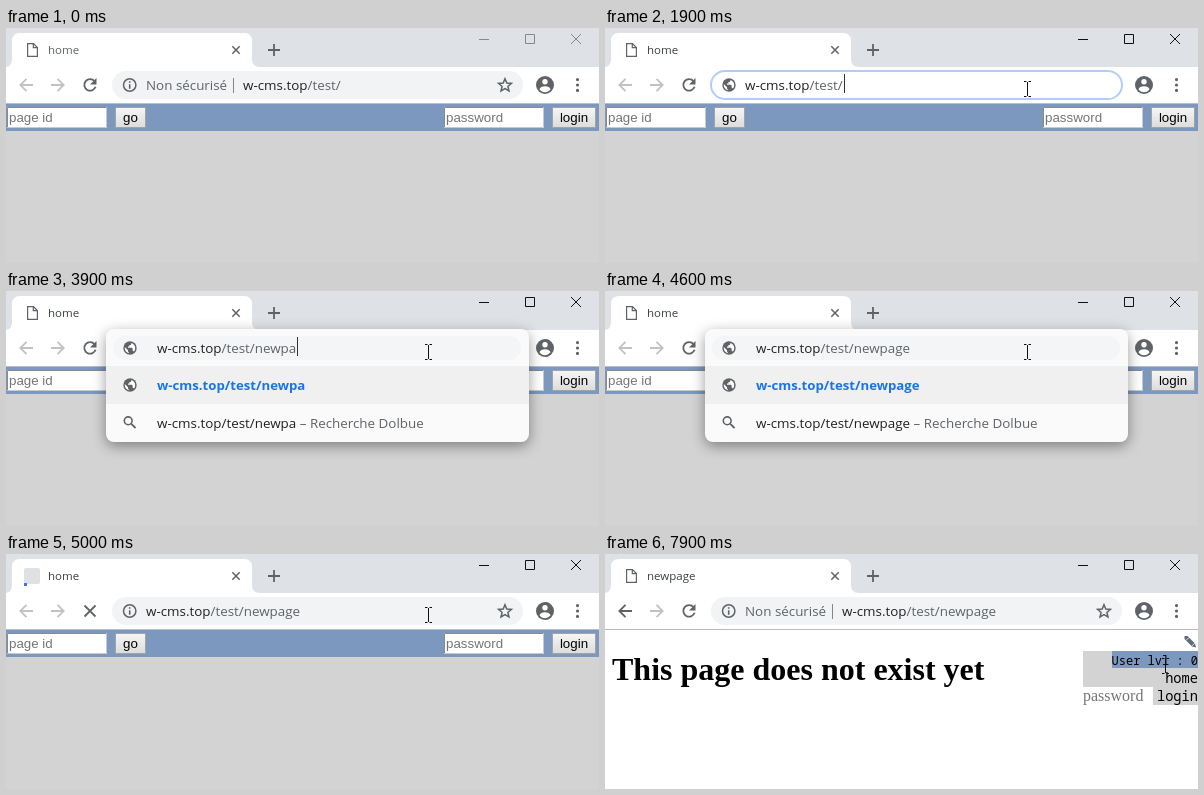
These frames come from a looping animation (593x235 px, 8 s). An HTML page:

```html
<!DOCTYPE html>
<html lang="fr">
<head>
<meta charset="utf-8">
<title>Browser demo</title>
<style>
html, body { margin: 0; width: 100%; height: 100%; overflow: hidden; background: #fff; }
svg { display: block; width: 593px; height: 235px; }
text { white-space: pre; }
.ui { font: 13.4px "Open Sans", "Noto Sans", sans-serif; fill: #5f6368; }
.ui .host, .dark { fill: #202124; }
.tab { font-size: 11.5px; fill: #45494d; }
.hit { font-weight: 700; font-size: 13.2px; fill: #1a73e8; }
.form { font: 13.33px "Liberation Sans", Arial, sans-serif; }
.hint { fill: #757575; }
.mono { font-family: "Noto Sans Mono", "DejaVu Sans Mono", monospace; text-anchor: end; }
.line { fill: none; stroke: #5f6368; stroke-width: 1.8; }
#popup { filter: drop-shadow(0 4px 7px rgba(0,0,0,.4)); }
</style>
</head>
<body>
<svg viewBox="0 0 593 235">
  <defs>
    <g id="globe">
      <circle r="6.7" fill="#5f6368"/>
      <path fill="#fff" d="M-5.2-.9L-2 2.3V3.6L-.7 5.2C-3.5 5-5.4 2.8-5.2-.9ZM1.6-5C4 -4 5.3-2 5.2.2 5.2 1.8 4.6 2.9 3.8 3.6L2.6 2.6V.6L1.8-.2H-2V-1.6H-.6V-3H.8Z"/>
    </g>
    <g id="field">
      <path d="M0 0H100V21H0Z" fill="#fff"/>
      <path d="M.5 20.5V.5H99.5" fill="none" stroke="#8a8a8a"/>
      <path d="M.5 20.5H99.5V.5" fill="none" stroke="#c9c9c9"/>
    </g>
    <linearGradient id="face" x2="0" y2="1">
      <stop stop-color="#f6f6f6"/><stop offset="1" stop-color="#dcdcdc"/>
    </linearGradient>
  </defs>

  <!-- window -->
  <path fill="#dee1e6" d="M0 0H593V39H0Z"/>
  <path fill="#fff" d="M0 39Q6 38 6 31V13Q6 5 14 5H238Q246 5 246 13V31Q246 39 254 39H593V75H0Z"/>
  <path id="doc" class="line" style="stroke-width:1.2" d="M21.6 15.6H27.5L31.4 19.5V28.4H21.6ZM27.3 15.6V19.7H31.4"/>
  <g id="busy"><rect x="18" y="14" width="16" height="16" rx="2" fill="#dfe1e5"/><path fill="#3b78e7" d="M18 29H21V32H18Z"/></g>
  <text id="title" class="ui tab" x="42" y="26"></text>
  <path class="line" style="stroke-width:1.5" d="M226.3 18.3L233.7 25.7M233.7 18.3L226.3 25.7"/>
  <path class="line" d="M262 22H274M268 16V28"/>
  <path id="controls" fill="none" d="M473 11.5H483M519.5 6.5H528.5V15.5H519.5ZM565 6L575 16M575 6L565 16"/>
  <path id="back" class="line" d="M27 57H14.5M20.5 50.8L14.3 57L20.5 63.2"/>
  <path class="line" style="stroke:#c0c2c5" d="M45 57H57.5M51.5 50.8L57.7 57L51.5 63.2"/>
  <g id="reload"><path class="line" d="M88.6 53.2A5.8 5.8 0 1 0 89.6 58.8"/><path fill="#5f6368" d="M90.5 50V56.5H84Z"/></g>
  <path id="stop" class="line" d="M78.5 51.5L89.5 62.5M89.5 51.5L78.5 62.5"/>
  <circle cx="539" cy="57" r="9" fill="#5f6368"/>
  <circle cx="539" cy="53.8" r="2.7" fill="#fff"/>
  <path fill="#fff" d="M533.5 61.2Q534.5 58.2 539 58.2T544.5 61.2Q542.5 64.2 539 64.2T533.5 61.2Z"/>
  <path stroke="#5f6368" stroke-width="3.2" stroke-linecap="round" d="M571.5 51.6h.01M571.5 57h.01M571.5 62.4h.01"/>

  <!-- first page -->
  <g id="home" class="form">
    <path fill="#d3d3d3" d="M0 75H593V235H0Z"/>
    <path fill="#7c98bf" d="M0 75H593V103H0Z"/>
    <path fill="#b5bfce" d="M0 75H593V76H0Z"/>
    <use href="#field" x="1" y="79"/><use href="#field" x="438" y="79"/>
    <text class="hint" x="3" y="94">page id</text>
    <text class="hint" x="440" y="94">password</text>
    <g fill="url(#face)" stroke="#a3a3a3">
      <rect x="109.5" y="79.5" width="30" height="20"/><rect x="546.5" y="79.5" width="43" height="20"/>
    </g>
    <g text-anchor="middle"><text x="124.5" y="94">go</text><text x="568" y="94">login</text></g>
  </g>

  <!-- second page -->
  <g id="missing">
    <path fill="#fff" d="M0 75H593V235H0Z"/>
    <path fill="#b8babd" d="M0 75H593V76H0Z"/>
    <text x="7" y="126" style="font:bold 32px 'Liberation Serif',Times,serif">This page does not exist yet</text>
    <path fill="#5d6b7d" d="M579.5 82L582.5 82L590 89.5L591 93.5L587 92.5L579.5 85Z"/>
    <path stroke="#fff" stroke-width=".8" d="M581 86.5L584 83.5M586.8 92L589.8 89"/>
  </g>
  <g id="menu">
    <path fill="#d3d3d3" d="M478 97H593V151H548V133H478Z"/>
    <path fill="#7c98bf" d="M507 97H593V114H507Z"/>
    <g class="mono">
      <text x="593" y="111" font-size="12">User lvl : 0</text>
      <text x="593" y="129" font-size="13.7">home</text>
      <text x="593" y="147" font-size="13.7">login</text>
    </g>
    <text class="hint" x="478" y="147" style="font:16px 'Liberation Serif',Times,serif">password</text>
  </g>

  <!-- suggestions -->
  <g id="popup">
    <rect x="100" y="38" width="423" height="113" rx="8" fill="#fafafa"/>
    <path fill="#f0f0f1" d="M100 75H523V113H100Z"/>
    <use href="#globe" x="124" y="94"/>
    <circle class="line" cx="122.2" cy="129.8" r="3.9" style="stroke-width:1.6"/><path class="line" d="M125 132.6L129.5 137"/>
    <text class="ui hit" x="151" y="99"></text>
    <text class="ui" x="151" y="137"><tspan class="dark" id="query"></tspan> – Recherche Dolbue</text>
  </g>

  <!-- address bar -->
  <rect id="pill"/>
  <g id="info"><circle class="line" cx="123.7" cy="57" r="6.2" style="stroke-width:1.5"/><path stroke="#5f6368" stroke-width="1.6" d="M123.7 53.2V54.8M123.7 56.2V60.8"/></g>
  <use id="edit" href="#globe" x="124" y="57"/>
  <g id="chip"><text class="ui" x="140" y="62">Non sécurisé</text><path fill="#80868b" d="M227 50H228V65H227Z"/></g>
  <path id="mark" fill="#0078d7" d="M237 46H337V66H237Z"/>
  <text id="url" class="ui" y="62"><tspan class="host">w-cms.top</tspan><tspan id="path"></tspan></text>
  <path id="caret" fill="#333" d="M0 46H1V65H0Z"/>
  <path id="star" class="line" style="stroke-width:1.5" d="M499 50.8L500.8 55.1L505.4 55.4L501.9 58.4L503 62.9L499 60.5L495 62.9L496.1 58.4L492.6 55.4L497.2 55.1Z"/>

  <path id="arrow" fill="#fff" stroke="#111" d="M.5.5V16L4 12.8L6.4 18L8.6 17L6.3 12H11Z"/>
  <path id="beam" fill="none" stroke="#111" d="M-3.5-7.5H-1M1-7.5H3.5M0-7V7M-3.5 7.5H-1M1 7.5H3.5"/>
</svg>
<script>
const LOOP = 8000, STEP = 100;
const el = {};
document.querySelectorAll('[id]').forEach(e => el[e.id] = e);
const hit = document.querySelector('.hit');

const show = (name, on) => el[name].style.display = on ? '' : 'none';
const set = (name, attrs) => { for (const k in attrs) el[name].setAttribute(k, attrs[k]); };
const within = (t, a, b) => t >= a && t < b;
const mix = (a, b, p) => a + (b - a) * p;
const smooth = p => p * p * (3 - 2 * p);

// time at which each letter of "newpage" is typed
const keys = [2700, 2900, 3400, 3700, 3900, 4000, 4200];

function pointer(t) {
  if (t < 400) return null;
  if (t < 6700) {
    const p = 1 - (1 - Math.min(1, (t - 400) / 600)) ** 2;
    const y = mix(91, 61, p);
    return { x: mix(468, 422.5, p), y, beam: y < 72 };
  }
  if (t < 7600) {
    const p = smooth(Math.min(1, (t - 6700) / 800));
    return { x: mix(448, 579, p), y: mix(92, 78, p), beam: false };
  }
  const p = Math.max(0, Math.min(1, (t - 7700) / 200));
  return { x: mix(583, 560.5, p), y: mix(86, 111.5, p), beam: true };
}

function render(t) {
  const active = t >= 1200, open = within(t, 2700, 4900), editing = within(t, 1900, 4900);
  const loaded = t >= 5100, done = t >= 5200;
  const chip = t < 1900 || done, loading = within(t, 4900, 5400);
  const typed = 'newpage'.slice(0, keys.filter(k => t >= k).length);
  const selected = within(t, 1300, 1900);

  // window and pages
  el.title.textContent = done ? 'newpage' : 'home';
  el.title.style.fill = active ? '#3c4043' : '#5f6368';
  set('controls', { stroke: active ? '#111' : '#85888c' });
  el.back.style.stroke = done ? '#5f6368' : '#c0c2c5';
  show('doc', !within(t, 4900, 5200));
  show('busy', within(t, 4900, 5200));
  show('reload', !loading);
  show('stop', loading);
  show('home', !loaded);
  show('missing', loaded);
  show('menu', t >= 7400);

  // suggestions
  show('popup', within(t, 2700, 5000));
  el.popup.style.opacity = t < 2800 ? .7 : t < 4900 ? 1 : .13;
  hit.textContent = el.query.textContent = 'w-cms.top/test/' + typed;

  // address bar
  const focus = within(t, 1200, 2700);
  set('pill', open
    ? { x: 107, y: 45, width: 408, height: 24, rx: 12, fill: '#f4f5f6', stroke: 'none' }
    : focus
      ? { x: 106, y: 43, width: 411, height: 28, rx: 14, fill: '#fff', stroke: '#b0cdf8',
          'stroke-width': 2, 'stroke-opacity': t < 1300 ? .5 : 1 }
      : { x: 106, y: 43, width: 411, height: 28, rx: 14, fill: '#f1f3f4', stroke: 'none' });
  show('info', !editing);
  show('edit', editing);
  show('chip', chip);
  show('star', !editing);
  show('mark', selected);
  const x = chip ? 237 : open ? 151 : 140;
  set('url', { x });
  el.path.textContent = '/test/' + typed;
  el.url.querySelectorAll('tspan').forEach(s => s.style.fill = selected ? '#fff' : '');
  show('caret', editing && !within(t, 2300, 2700) && !within(t, 4600, 4900));
  set('caret', { transform: `translate(${Math.round(x + el.url.getComputedTextLength() + .8)} 0)` });

  // pointer
  const p = pointer(t);
  show('arrow', p && !p.beam);
  show('beam', p && p.beam);
  if (p) set(p.beam ? 'beam' : 'arrow', { transform: `translate(${Math.floor(p.x) + (p.beam ? .5 : 0)} ${Math.round(p.y)})` });
}

function tick() {
  render(Math.floor(performance.now() % LOOP / STEP) * STEP);
  requestAnimationFrame(tick);
}
tick();
</script>
</body>
</html>
```
